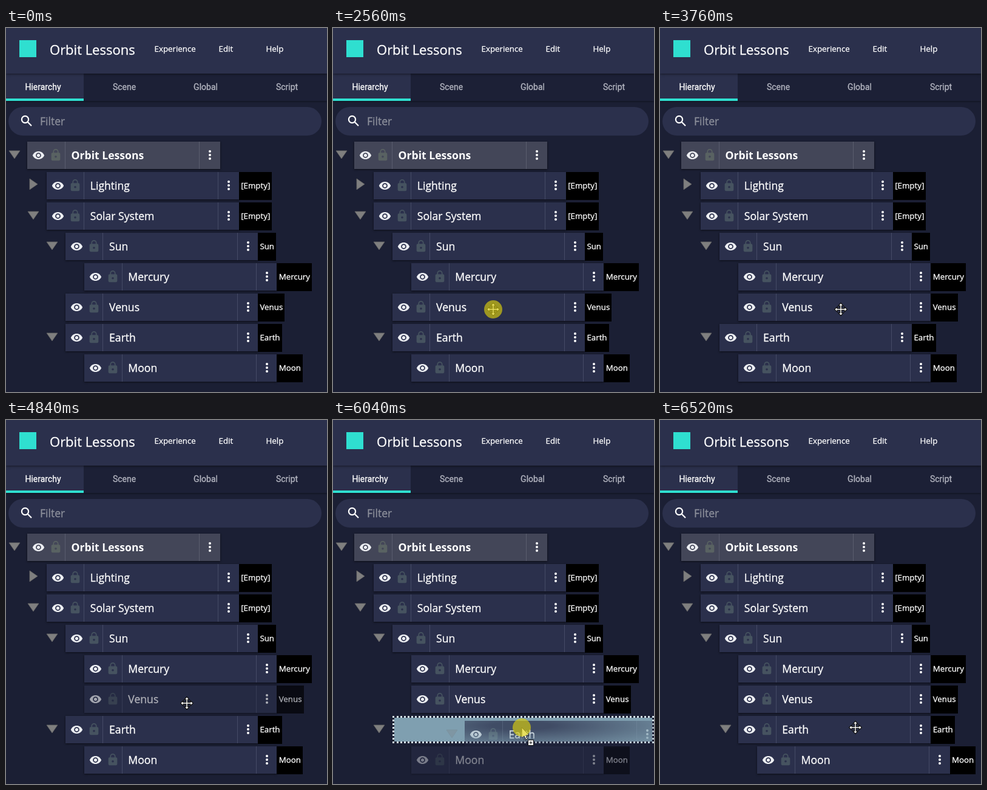
Recreate the animation shown at these times as an HTML page. Size 529 px wide and 599 px high, loop 9600 ms.

```html
<!DOCTYPE html>
<html lang="en">
<head>
<meta charset="utf-8">
<title>Hierarchy panel</title>
<style>
  html, body { margin: 0; width: 100%; height: 100%; overflow: hidden; background: #1b1f34; }
  #stage {
    position: relative; width: 529px; height: 599px; overflow: hidden;
    background: #1b1f34; color: #fff;
    font: 17.6px "Open Sans", "Noto Sans", sans-serif; white-space: nowrap;
    -webkit-text-stroke: .3px;
  }
  #stage *, #stage { box-sizing: border-box; }
  #stage div, #stage svg { position: absolute; }

  .header { left: 0; top: 0; width: 529px; height: 75px; background: #2b304c; z-index: 1; box-shadow: 0 1px 4px #0008; }
  .logo { left: 22px; top: 20px; width: 28px; height: 28px; background: #2fdfd0; }
  .title { left: 72px; line-height: 70px; font-size: 22px; }
  .menu { line-height: 69px; font-size: 13.333px; }

  .tabs { left: 0; top: 75px; width: 529px; height: 45px; background: #1c2036; box-shadow: 0 1px 3px #0007; }
  .tab { top: 0; width: 134px; line-height: 45px; text-align: center; font-family: Roboto, sans-serif; font-size: 14px; color: #b3b5c0; }
  .active { left: 0; top: 0; width: 128px; height: 45px; background: #2b304c; border-bottom: 4px solid #2fdfd0; }

  .filter { left: 4px; top: 130px; width: 516px; height: 47px; border-radius: 24px; background: #2b304c; line-height: 47px; color: #8b8e9a; padding-left: 52px; }
  .filter svg { left: 18px; top: 11px; }

  .node { height: 45px; }
  .body { left: 0; top: 0; width: 317.3px; height: 45px; background: #2b304c; box-shadow: 0 1px 3px #0009; line-height: 45px; }
  .root .body { background: #434658; font-weight: 700; -webkit-text-stroke: 0; }
  .cell { top: 0; width: 1px; height: 45px; background: #454b66; }
  .root .cell { background: #5a5d6e; }
  .name { left: 72.2px; }
  .tag { left: 100%; top: 0; height: 46px; padding: 0 3.2px; background: #000; font-size: 13.333px; }
  .eye { left: 8px; top: 11.5px; fill: #eceef2; }
  .lock { left: 36px; top: 11px; fill: #465360; }
  .root .lock { fill: #596262; }
  .dots { left: 288.8px; top: 10px; fill: #fff; }
  .caret { left: -32.5px; top: 10px; fill: #7f7f7f; stroke: #666; stroke-width: .8; }

  #drop { right: 0; height: 45px; background: #7f9fb0 padding-box; border: 3px dotted #d5e3ea; }
  .ghost .body {
    --fade: radial-gradient(ellipse 330px 46px at var(--gx) 8px, #000 15%, #0006 65%, transparent);
    opacity: .74; box-shadow: none;
    -webkit-mask-image: var(--fade); mask-image: var(--fade);
  }
  .ghost .caret { opacity: .25; }
  #cursor { left: 0; top: 0; width: 0; height: 0; }
  #cursor svg { left: -16px; top: -16px; overflow: visible; }
  #press { left: -15px; top: -15px; width: 30px; height: 30px; border-radius: 50%; background: rgba(220, 208, 12, .65); }
</style>
</head>
<body>
<div id="stage">
  <div class="header">
    <div class="logo"></div>
    <div class="title">Orbit Lessons</div>
    <div class="menu" style="left:244.5px">Experience</div>
    <div class="menu" style="left:350.5px">Edit</div>
    <div class="menu" style="left:428.5px">Help</div>
  </div>
  <div class="tabs">
    <div class="active"></div>
    <div class="tab" style="left:-6px;color:#fff">Hierarchy</div>
    <div class="tab" style="left:128px">Scene</div>
    <div class="tab" style="left:262px">Global</div>
    <div class="tab" style="left:396px">Script</div>
  </div>
  <div class="filter">
    <svg width="24" height="24" fill="none" stroke="#fff" stroke-width="2.2"><circle cx="9.5" cy="9.5" r="5.6"/><path d="M13.8 13.8 20 20"/></svg>
    Filter
  </div>
  <div id="tree"></div>
  <div id="drop"></div>
  <div id="ghosts"></div>
  <div id="cursor">
    <svg id="move" width="32" height="32"><path d="M16 5.5l4.2 4.6h-2.9v4.6h4.6v-2.9l4.6 4.2-4.6 4.2v-2.9h-4.6v4.6h2.9L16 26.5l-4.2-4.6h2.9v-4.6h-4.6v2.9L5.5 16l4.6-4.2v2.9h4.6v-4.6h-2.9z" fill="#fff" stroke="#111" stroke-width="1.2"/></svg>
    <svg id="arrow" width="40" height="44">
      <path d="M16 16v17.5l4-3.8 2.8 6.3 2.6-1.2-2.7-6h5.6z" fill="#fff" stroke="#222"/>
      <path d="M19 37l8-8M22 38l5-5" stroke="#222" stroke-dasharray="1 1"/>
      <path d="M26.5 36.5h9v9h-9z" fill="#fff" stroke="#111"/>
      <path d="M28.5 41h5M31 38.5v5" stroke="#111"/>
    </svg>
    <div id="press"></div>
  </div>
</div>
<script>
const LOOP = 9600, STEP = 80;
const $ = id => document.getElementById(id);
const EYE = 'M12 4.5C7 4.5 2.7 7.6 1 12c1.7 4.4 6 7.5 11 7.5s9.3-3.1 11-7.5c-1.7-4.4-6-7.5-11-7.5zM12 17a5 5 0 1 1 0-10 5 5 0 0 1 0 10zm0-8a3 3 0 1 0 0 6 3 3 0 0 0 0-6z';
const LOCK = 'M18 8h-1V6A5 5 0 0 0 7 6v2H6a2 2 0 0 0-2 2v10a2 2 0 0 0 2 2h12a2 2 0 0 0 2-2V10a2 2 0 0 0-2-2zm-6 9a2 2 0 1 1 0-4 2 2 0 0 1 0 4zM15.1 8H8.9V6a3.1 3.1 0 0 1 6.2 0z';
const DOTS = 'M10 6a2 2 0 1 0 4 0a2 2 0 1 0-4 0M10 12a2 2 0 1 0 4 0a2 2 0 1 0-4 0M10 18a2 2 0 1 0 4 0a2 2 0 1 0-4 0';
const CARETS = { down: 'M2 5h18l-9 13z', right: 'M5 1v18l13-9z' };

const icon = (cls, d, size, box = 24) =>
  `<svg class="${cls}" width="${size}" height="${size}" viewBox="0 0 ${box} ${box}"><path d="${d}"/></svg>`;
const indent = depth => 35.4 + 31.25 * depth;
const rowTop = row => 187 + 50 * row;

function place(el, x, y) {
  el.style.left = x + 'px';
  el.style.top = y + 'px';
}

function makeNode(parent, { name, depth, tag, caret }, row, cls = '') {
  const el = document.createElement('div');
  el.className = 'node ' + cls;
  el.innerHTML = (caret ? icon('caret', CARETS[caret], 22, 22) : '') +
    `<div class="body">${icon('eye', EYE, 21)}${icon('lock', LOCK, 22)}
      <div class="cell" style="left:61.5px"></div><div class="name">${name}</div>
      <div class="cell" style="left:282.7px"></div>${icon('dots', DOTS, 24)}
      ${tag ? `<div class="tag">${tag}</div>` : ''}</div>`;
  place(el, indent(depth), rowTop(row));
  parent.append(el);
  return el;
}

const data = [
  { name: 'Orbit Lessons', depth: 0, caret: 'down' },
  { name: 'Lighting', depth: 1, tag: '[Empty]', caret: 'right' },
  { name: 'Solar System', depth: 1, tag: '[Empty]', caret: 'down' },
  { name: 'Sun', depth: 2, tag: 'Sun', caret: 'down' },
  { name: 'Mercury', depth: 3, tag: 'Mercury' },
  { name: 'Venus', depth: 2, tag: 'Venus' },
  { name: 'Earth', depth: 2, tag: 'Earth', caret: 'down' },
  { name: 'Moon', depth: 3, tag: 'Moon' }
];
const VENUS = 5, EARTH = 6, MOON = 7;
const nodes = data.map((d, row) => makeNode($('tree'), d, row, row ? '' : 'root'));
const ghosts = [VENUS, EARTH].map(row => makeNode($('ghosts'), data[row], row, 'ghost'));

// press, drag, nest, drop and settle times, with the pointer x at the press
const drags = [
  { row: VENUS, press: 2560, drag: 2800, nest: 3600, drop: 3680, settle: 3760, x: 264 },
  { row: EARTH, press: 5400, drag: 5880, nest: 6120, drop: 6440, settle: 6520, x: 298 }
];

const within = (t, a, b) => t >= a && t < b;
const show = (el, on) => { el.style.display = on ? '' : 'none'; };
const smooth = p => p * p * (3 - 2 * p);
const progress = (t, start, n) =>
  Math.min(1, Math.max(0, (Math.floor((t - start) / STEP) + 1) / n));

function setNode(row, depth, opacity) {
  nodes[row].style.left = indent(depth) + 'px';
  nodes[row].querySelector('.body').style.opacity = opacity;
}

function draw(t) {
  const approach = smooth(progress(t, 1680, 10));
  const x = 507 - 243 * approach + 13 * progress(t, 2800, 3) + 21 * progress(t, 3600, 2)
    + 22 * progress(t, 5880, 5) + 2 * progress(t, 6360, 1);
  const y = 473 - 10 * approach + 42 * smooth(progress(t, 4840, 6)) + progress(t, 5880, 1);

  const active = drags.find(d => within(t, d.drag, d.drop));
  const settling = drags.find(d => within(t, d.drop, d.settle));
  const venusDepth = t < drags[0].nest ? 2 : 3;
  const earthDepth = t < drags[1].nest ? 2 : 3;
  const hover = row => within(t, 1600, 2560) && row === VENUS ||
    within(t, 4840, 5400) && row === (y < 485 ? VENUS : EARTH);
  const alpha = row => active?.row === row ? 0
    : hover(row) || settling?.row === row ? .65 : 1;

  setNode(VENUS, venusDepth, alpha(VENUS));
  setNode(EARTH, earthDepth, alpha(EARTH));
  setNode(MOON, earthDepth + 1, within(t, drags[1].drag, drags[1].settle) ? .45 : 1);

  show($('drop'), active);
  if (active) place($('drop'), indent(active.row === VENUS ? venusDepth : earthDepth), rowTop(active.row));
  drags.forEach((d, i) => {
    const left = 204 + x - d.x;
    show(ghosts[i], d === active);
    place(ghosts[i], left, rowTop(d.row) + 8);
    ghosts[i].style.setProperty('--gx', x - left + 'px');
  });

  show($('cursor'), t >= 1600);
  place($('cursor'), x, y);
  show($('move'), !active);
  show($('arrow'), active);
  show($('press'), drags.some(d => within(t, d.press, d.drop)));
}

const start = performance.now();
function frame() {
  draw((performance.now() - start) % LOOP);
  requestAnimationFrame(frame);
}
frame();
</script>
</body>
</html>
```
